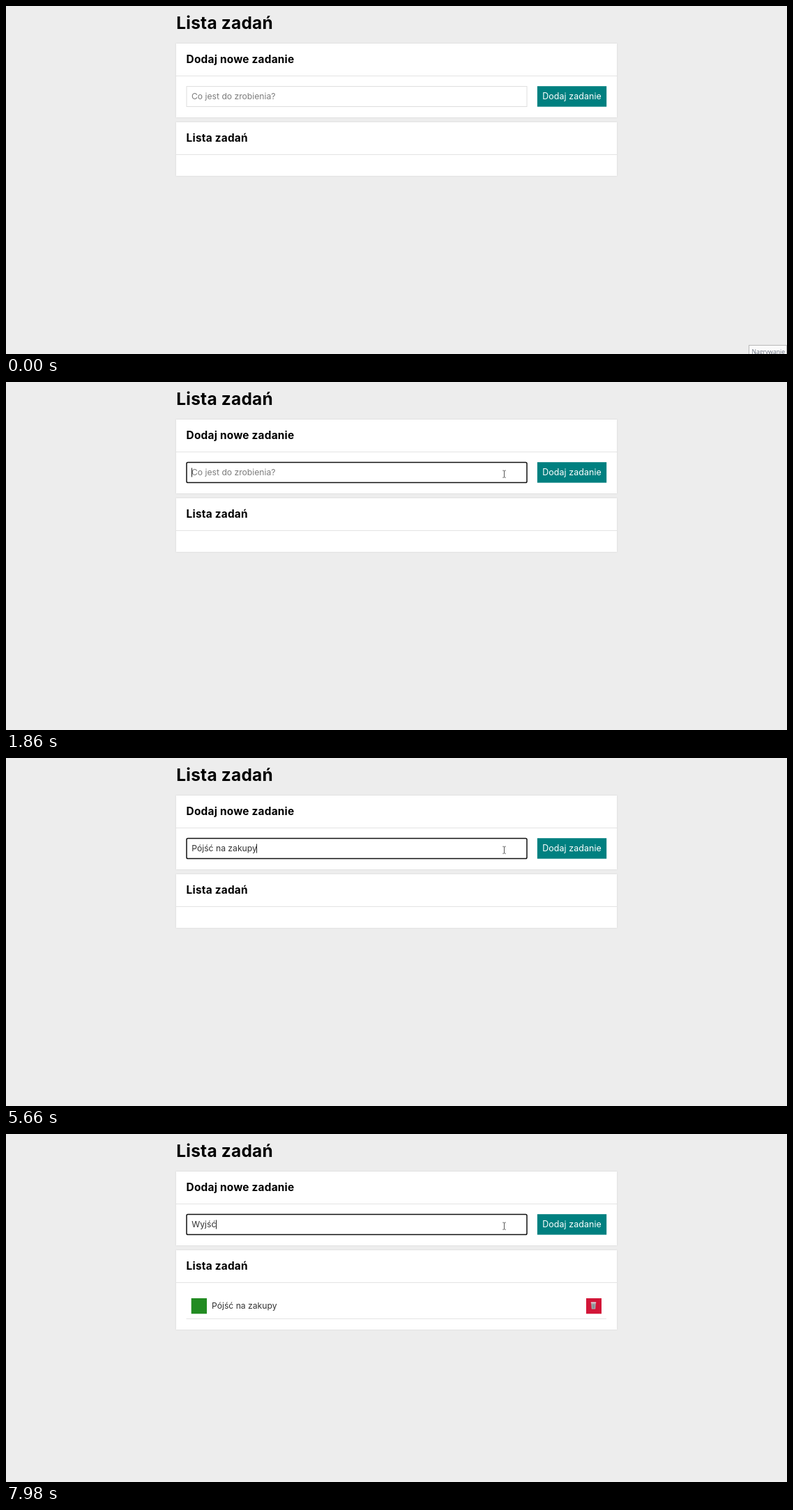
An HTML page that plays this animation: 1120 by 500 pixels, repeating every 8 s.

```html
<!DOCTYPE html>
<html lang="pl">
<head>
<meta charset="utf-8">
<title>Lista zadań</title>
<style>
  html, body { margin: 0; width: 100%; height: 100%; overflow: hidden; background: #ededed; }
  .card { position: absolute; left: 244px; width: 632px; background: #fff; box-shadow: 0 0 2px #d0d0d0; }
  #add { top: 54px; height: 105.5px; }
  #list { top: 167px; height: 76.5px; }
  .filled #list { height: 113.5px; }
  svg { position: absolute; left: 0; top: 0; display: block; }
  text { font: 400 12.15px Inter, "Noto Sans", sans-serif; white-space: pre; }
  .title { font-size: 24.4px; font-weight: 700; letter-spacing: .25px; }
  .head { font-size: 15.4px; font-weight: 700; letter-spacing: .22px; }
  .btn { font-size: 12.45px; letter-spacing: .07px; fill: #fff; }
  .hint { fill: #7c7c7c; }
  .body { fill: #333; }
  .tip { font: 8.6px "Open Sans", "Noto Sans", sans-serif; fill: #6b7280; }
  .rule { fill: #e4e4e4; }
  #item { visibility: hidden; }
  .filled #item { visibility: visible; }
  #field { fill: #fff; stroke: #dedede; stroke-width: 1; }
  .focus #field { stroke: #101010; stroke-width: 1.5; }
</style>
</head>
<body>
<div class="card" id="add"></div>
<div class="card" id="list"></div>
<svg width="1120" height="500" viewBox="0 0 1120 500">
  <text class="title" x="244.3" y="33.3">Lista zadań</text>

  <text class="head" x="258.6" y="82.4">Dodaj nowe zadanie</text>
  <rect class="rule" x="244" y="100" width="632" height="1"/>
  <rect id="field" x="259" y="115.6" width="488" height="28.9"/>
  <text class="hint" id="hint" x="266" y="134.4">Co jest do zrobienia?</text>
  <text class="body" id="typed" x="266.3" y="134.4"></text>
  <rect id="caret" y="123.5" width="1" height="13" fill="#222"/>
  <rect x="761.9" y="115.2" width="99.3" height="29.5" fill="#008080"/>
  <text class="btn" x="769.3" y="134.4">Dodaj zadanie</text>

  <text class="head" x="258.6" y="195.4">Lista zadań</text>
  <rect class="rule" x="244" y="213" width="632" height="1"/>
  <g id="item">
    <rect x="265.7" y="236" width="22.3" height="22.3" fill="#228b22"/>
    <text class="body" x="295" y="250.8">Pójść na zakupy</text>
    <rect x="832" y="236" width="22" height="22.3" fill="#d21638"/>
    <path d="M839.2 243.2h6.6l-.6 8.3h-5.4z" fill="#a9b0b3"/>
    <path d="M841 244.5l.3 6M842.5 244.5v6M844 244.5l-.3 6" stroke="#69757a" stroke-width=".6"/>
    <rect x="838.7" y="241.6" width="7.6" height="1.6" rx=".8" fill="#d5dadc"/>
    <rect class="rule" x="258.5" y="265" width="602.5" height="1"/>
  </g>

  <g id="tip">
    <rect x="1065.5" y="487.5" width="54" height="20" fill="#fafafa" stroke="#b9b9b9"/>
    <text class="tip" x="1069.5" y="500.2">Nagrywanie</text>
  </g>

  <g id="mouse">
    <circle id="halo" cx="-1.3" cy="-.2" r="8.7" fill="#ff0" fill-opacity=".52"/>
    <path id="beam" d="M-2.2-5h1.5l.7.6.7-.6h1.5M0-4.4v8.8M-2.2 5h1.5l.7-.6.7.6h1.5" fill="none" stroke="#444" stroke-width=".9"/>
    <path id="arrow" d="M0 0v12.2l2.8-2.6 1.8 4.2 1.8-.8-1.8-4h3.9z" fill="#fff" stroke="#111" stroke-width=".7"/>
  </g>
</svg>
<script>
const LOOP = 8000, MOVE = 20, STOP = 790, CLICK = 850, SUBMIT = 6070;
const FIRST = "Pójść na zakupy", SECOND = "Wyjść";
const firstKeys = [2440, 2910, 3100, 3340, 3780, 4100, 4300, 4390, 4490, 4720, 4930, 5010, 5210, 5500, 5660];
const secondKeys = [7000, 7410, 7640, 7910, 7980];
const blinks = [[CLICK, 1340], [1860, 2400], [2440, 6730], [7000, LOOP]];

const el = id => document.getElementById(id);
const show = (id, on) => el(id).setAttribute("visibility", on ? "inherit" : "hidden");
const count = (keys, t) => keys.filter(k => k <= t).length;
const bezier = (a, b, c, u) => (1 - u) ** 2 * a + 2 * u * (1 - u) * b + u * u * c;

// The pointer moves in 17 even time steps along one curve.
function movePointer(t) {
  const step = Math.min(17, Math.floor((t - MOVE) / (STOP - MOVE) * 17 + 1e-6));
  const p = Math.max(0, step / 17);
  const u = 1 - (1 - p) ** 2 * (1 + 2 * p * (1 - p));
  const x = bezier(1085, 833, 714.5, u), y = bezier(506, 307, 132.2, u);
  const inField = x > 259 && x < 747 && y > 115 && y < 145;
  el("mouse").setAttribute("transform", `translate(${x} ${y})`);
  show("mouse", t >= MOVE);
  show("halo", t < CLICK);
  show("beam", inField);
  show("arrow", !inField);
}

function draw() {
  const t = performance.now() % LOOP;
  const text = t < SUBMIT
    ? FIRST.slice(0, count(firstKeys, t))
    : SECOND.slice(0, count(secondKeys, t));
  const typed = el("typed");
  if (typed.textContent !== text) typed.textContent = text;
  const width = text ? typed.getComputedTextLength() : 0;
  el("caret").setAttribute("x", Math.round(266 + width));
  show("caret", blinks.some(([a, b]) => t >= a && t < b));
  show("hint", !text);
  show("tip", t < 60);

  const focus = t >= CLICK;
  document.body.classList.toggle("focus", focus);
  document.body.classList.toggle("filled", t >= SUBMIT);
  el("field").setAttribute("rx", focus ? 1.8 : 0);

  movePointer(t);
  requestAnimationFrame(draw);
}
draw();
</script>
</body>
</html>
```
